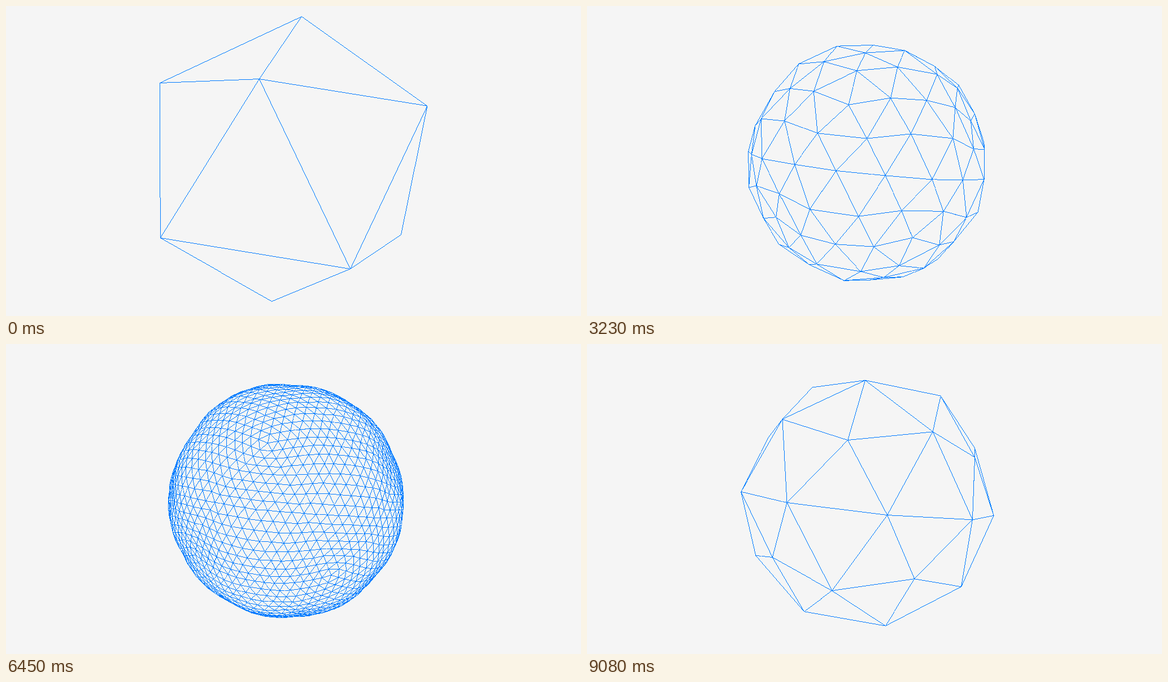
An HTML page with a canvas for the animation above (9.21 s loop, 1018x550 px).

```html
<!DOCTYPE html>
<html lang="en">
<head>
<meta charset="utf-8">
<title>Subdivided icosahedron</title>
<style>
  html, body { margin: 0; width: 100%; height: 100%; overflow: hidden; background: #f5f5f5; }
  canvas { display: block; }
</style>
</head>
<body>
<canvas id="stage" width="1018" height="550"></canvas>
<script>
const WIDTH = 1018, HEIGHT = 550;
const BACKGROUND = '#f5f5f5', LINE = '#007bff';

// Camera: x right, y down, z towards the viewer; perspective = radius / distance.
const CENTER = [495.95, 277.3], SCALE = 254.5, PERSPECTIVE = 0.3483;
const POLE = [-0.1290, -0.3982, 0.9080];   // one corner of the solid
const SIDE = [0.1033, -0.9921, 0.0728];    // a corner next to it

const LEVELS = [0, 1, 2, 3, 4, 5, 4, 3, 2, 1];
const STEP_COUNT = 80;

const dot = (a, b) => a[0] * b[0] + a[1] * b[1] + a[2] * b[2];
const mix = (a, b, p, q) => a.map((value, i) => value * p + b[i] * q);
const unit = a => a.map(value => value / Math.hypot(...a));
const cross = (a, b) => [
  a[1] * b[2] - a[2] * b[1],
  a[2] * b[0] - a[0] * b[2],
  a[0] * b[1] - a[1] * b[0]
];

function icosahedron() {
  const axis = unit(POLE);
  const u = unit(mix(SIDE, axis, 1, -dot(SIDE, axis)));
  const v = cross(axis, u);
  const half = [axis];
  for (let i = 0; i < 5; i++) {
    const angle = i * Math.PI * 2 / 5;
    const around = mix(u, v, Math.cos(angle), Math.sin(angle));
    half.push(mix(axis, around, 1 / Math.sqrt(5), 2 / Math.sqrt(5)));
  }
  const points = [...half, ...half.map(p => p.map(value => -value))];
  const upper = i => 1 + i % 5, lower = i => 7 + (i + 3) % 5;
  const faces = [];
  for (let i = 0; i < 5; i++) {
    faces.push(
      [0, upper(i), upper(i + 1)],
      [upper(i + 1), upper(i), lower(i)],
      [upper(i + 1), lower(i), lower(i + 1)],
      [6, lower(i + 1), lower(i)]
    );
  }
  return { points, faces };
}

// Edges split at their midpoints; existing corners relax towards their neighbours.
function subdivide({ points, faces }) {
  const sums = points.map(() => [0, 0, 0]);
  const counts = points.map(() => 0);
  const middles = [], seen = new Map();

  function link(from, to) {
    counts[from]++;
    for (let k = 0; k < 3; k++) sums[from][k] += points[to][k];
  }
  function middle(a, b) {
    const key = Math.min(a, b) * points.length + Math.max(a, b);
    if (!seen.has(key)) {
      seen.set(key, points.length + middles.length);
      middles.push(mix(points[a], points[b], 0.5, 0.5));
      link(a, b);
      link(b, a);
    }
    return seen.get(key);
  }

  const split = faces.flatMap(([a, b, c]) => {
    const ab = middle(a, b), bc = middle(b, c), ca = middle(c, a);
    return [[a, ab, ca], [ab, b, bc], [ca, bc, c], [ab, bc, ca]];
  });
  const relaxed = points.map((p, i) => mix(p, sums[i], 5 / 8, 3 / 8 / counts[i]));
  return { points: [...relaxed, ...middles], faces: split };
}

function project([x, y, z]) {
  const zoom = SCALE / (1 - PERSPECTIVE * z);
  return [CENTER[0] + x * zoom, CENTER[1] + y * zoom];
}

// One-pixel line without smoothing
function drawLine(pen, [x0, y0], [x1, y1]) {
  const steps = Math.max(1, Math.round(Math.max(Math.abs(x1 - x0), Math.abs(y1 - y0))));
  for (let i = 0; i <= steps; i++) {
    const t = i / steps;
    pen.fillRect(Math.round(x0 + (x1 - x0) * t), Math.round(y0 + (y1 - y0) * t), 1, 1);
  }
}

function render({ points, faces }) {
  const canvas = document.createElement('canvas');
  canvas.width = WIDTH;
  canvas.height = HEIGHT;
  const pen = canvas.getContext('2d');
  pen.fillStyle = BACKGROUND;
  pen.fillRect(0, 0, WIDTH, HEIGHT);
  pen.fillStyle = LINE;

  const flat = points.map(project);
  const drawn = new Set();
  for (const face of faces) {
    const [a, b, c] = face.map(i => flat[i]);
    const area = (b[0] - a[0]) * (c[1] - a[1]) - (b[1] - a[1]) * (c[0] - a[0]);
    if (area <= 0) continue;
    face.forEach((from, i) => {
      const to = face[(i + 1) % 3];
      const low = Math.min(from, to), high = Math.max(from, to);
      const key = low * points.length + high;
      if (drawn.has(key)) return;
      drawn.add(key);
      drawLine(pen, flat[low], flat[high]);
    });
  }
  return canvas;
}

const pictures = [];
for (let mesh = icosahedron(), level = 0; level < 6; level++) {
  pictures.push(render(mesh));
  if (level < 5) mesh = subdivide(mesh);
}

function stepLength(i) {
  if (i === 0) return 150;
  if (i === 22) return 60;
  return i % 4 === 2 ? 70 : 130;
}
const ends = [];
let duration = 0;
for (let i = 0; i < STEP_COUNT; i++) ends.push(duration += stepLength(i));

const stage = document.getElementById('stage').getContext('2d');
const start = performance.now();
let shown = -1;

function tick() {
  const time = (performance.now() - start) % duration;
  const level = LEVELS[ends.findIndex(end => time < end) % LEVELS.length];
  if (level !== shown) {
    stage.drawImage(pictures[level], 0, 0);
    shown = level;
  }
  requestAnimationFrame(tick);
}
tick();
</script>
</body>
</html>
```
